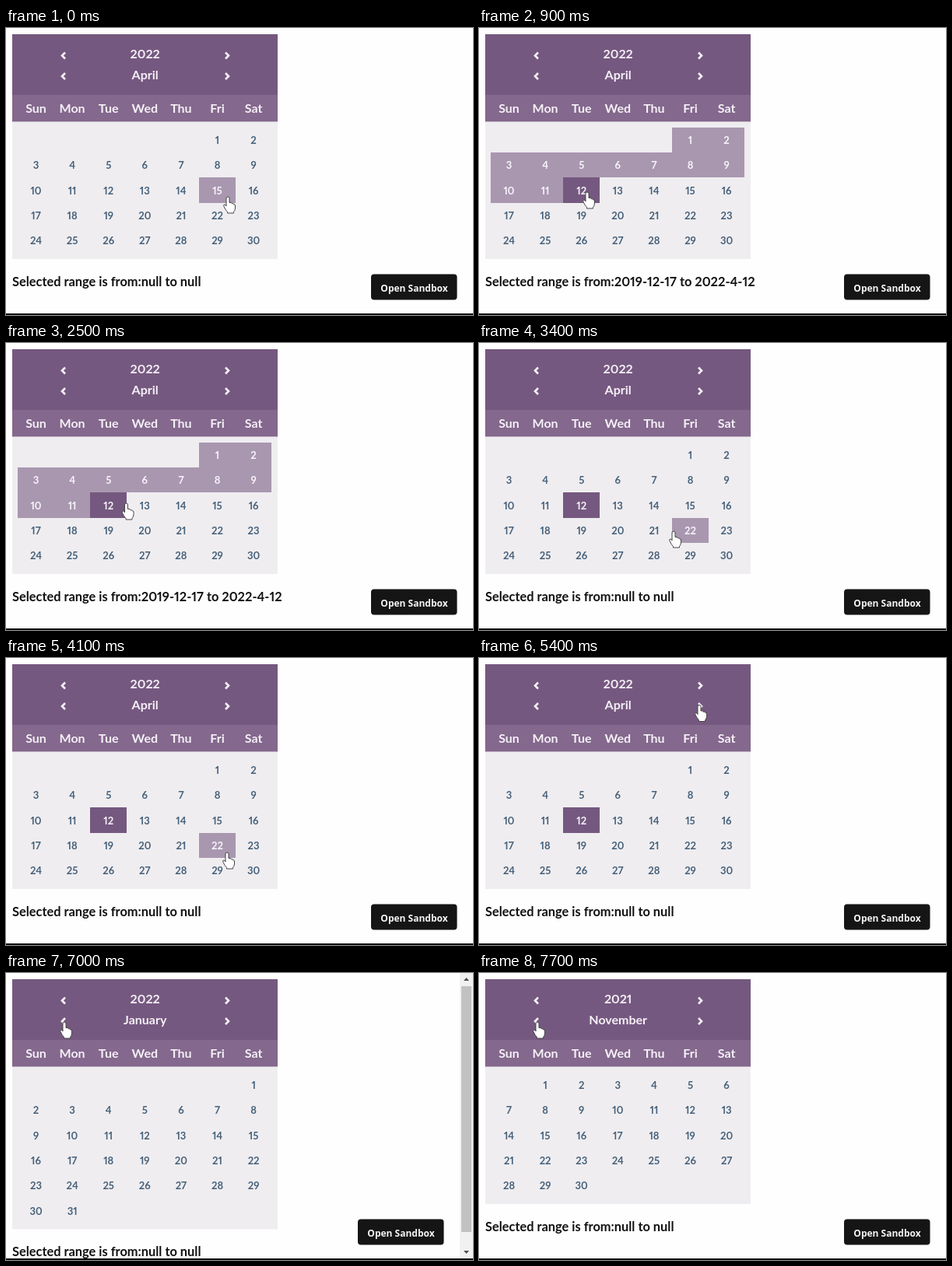
An HTML page for the animation above (8 s loop, 600 by 369 pixels).

```html
<!DOCTYPE html>
<html lang="en">
<head>
<meta charset="utf-8">
<title>Date range calendar</title>
<style>
  html, body { margin: 0; width: 100%; height: 100%; overflow: hidden; background: #fefefe; }
  svg { display: block; width: 600px; height: 369px; }
  text { font: 700 16px Lato, sans-serif; font-variant-numeric: proportional-nums; fill: #f5f0f7; }
  .mid { text-anchor: middle; }
  .date { font-size: 13px; }
  #range { font-size: 16.4px; fill: #111; }
  #button text { font: 700 12px "Open Sans", sans-serif; fill: #f4f4f4; }
  .arrow { fill: none; stroke: #f5f0f7; stroke-width: 2.6; }
</style>
</head>
<body>
<svg viewBox="0 0 600 369">
  <rect width="600" height="369" fill="#fefefe"/>
  <rect id="body" x="8" y="120" width="341" fill="#efedf0"/>
  <rect x="8" y="8" width="341" height="78" fill="#75587f"/>
  <rect x="8" y="86" width="341" height="34.4" fill="#84688d"/>
  <text id="year" class="mid" x="178.7" y="39"></text>
  <text id="month" class="mid" x="178.7" y="65.5"></text>
  <g id="grid"></g>
  <text id="range" x="8"></text>
  <g id="scrollbar">
    <rect x="583" width="17" height="367" fill="#f1f1f1"/>
    <rect x="585" y="17" width="13" height="316" fill="#c1c1c1"/>
    <path d="M588 10l3.5-4 3.5 4zM588 357l3.5 4 3.5-4z" fill="#505050"/>
  </g>
  <g id="button">
    <rect x="469" y="316.500" width="110.500" height="33" rx="4" fill="#151515"/>
    <text class="mid" x="524.500" y="338.500">Open Sandbox</text>
  </g>
  <rect y="367" width="600" height="2" fill="#000"/>
  <path id="hand" fill="#fff" stroke="#444" stroke-width="1" stroke-linejoin="round"
    d="M-2 2Q-2 0 0 0Q2 0 2 2V7.5Q5 6.5 5.3 8.8Q7.6 8 8 10Q9.8 9.6 9.5 12V15Q9 18 7.5 19.5V21H-.5V19.5Q-3 17 -5 12.5Q-6 10 -4 10Q-3 10 -2 12Z"/>
</svg>
<script>
const LOOP = 8000, STEP = 100, DAY = 864e5;
const LEFT = 15.2, TOP = 127.6, CELL_W = 46.6, CELL_H = 32.4;
const DARK = '#75587f', LIGHT = '#a997b0', INK = '#456079', PALE = '#f8f5fa';
const PICKED = Date.UTC(2022, 3, 12);

// The pointer rests between glides; hover follows from where it is.
const GLIDES = [
  { from: 0, to: 0, x: 285, y: 217 },
  { from: 100, to: 600, x: 139, y: 211 },
  { from: 1200, to: 1300, x: 262, y: 214 },
  { from: 2200, to: 2500, x: 154.5, y: 206 },
  { from: 3000, to: 3400, x: 250, y: 242 },
  { from: 3700, to: 3900, x: 300, y: 256 },
  { from: 4100, to: 4100, x: 284, y: 250 },
  { from: 4700, to: 5000, x: 283, y: 60.5 },
  { from: 6200, to: 6200, x: 75, y: 63 }
];
const BACK_CLICKS = [6300, 6700, 7000, 7300, 7700];
const rangeShown = time => time >= 800 && time < 2700;

const $ = id => document.getElementById(id);
const easeOut = p => 1 - (1 - p) ** 2;
const name = (date, format) => date.toLocaleString('en', { timeZone: 'UTC', ...format });

function add(tag, attrs, content = '') {
  const node = document.createElementNS('http://www.w3.org/2000/svg', tag);
  for (const key in attrs) node.setAttribute(key, attrs[key]);
  node.textContent = content;
  return $('grid').appendChild(node);
}

const cells = Array.from({ length: 42 }, (_, i) => {
  const col = i % 7, x = LEFT + CELL_W * col, y = TOP + CELL_H * Math.floor(i / 7);
  const center = x + CELL_W / 2;
  if (i < 7) {
    const weekday = name(new Date(Date.UTC(2022, 4, 1 + col)), { weekday: 'short' });
    add('text', { class: 'mid', x: center, y: 109 }, weekday);
  }
  return {
    box: add('rect', { x, y, width: CELL_W, height: CELL_H, 'shape-rendering': 'crispEdges' }),
    label: add('text', { class: 'mid date', x: center, y: y + 21.2 })
  };
});

for (const y of [35.5, 62]) {
  add('path', { class: 'arrow', d: `M76 ${y - 4}l-4 4 4 4M282 ${y - 4}l4 4-4 4` });
}

function pointer(time) {
  const tick = Math.floor(time / STEP) * STEP;
  let x = 0, y = 0;
  for (const glide of GLIDES) {
    if (tick < glide.from) break;
    const p = easeOut(Math.min(1, (tick - glide.from + STEP) / (glide.to - glide.from + STEP)));
    x += (glide.x - x) * p;
    y += (glide.y - y) * p;
  }
  return { x, y };
}

function cellUnder({ x, y }) {
  const col = Math.floor((x - LEFT) / CELL_W), row = Math.floor((y - TOP) / CELL_H);
  return row >= 0 ? row * 7 + col : -1;
}

function draw(time) {
  const hand = pointer(time), hovered = cellUnder(hand);
  const clicks = BACK_CLICKS.filter(click => click <= time).length;
  const first = new Date(Date.UTC(2022, 3 - clicks, 1));
  const offset = first.getUTCDay();
  const count = (Date.UTC(2022, 4 - clicks, 1) - first) / DAY;
  const extra = offset + count > 35 ? CELL_H : 0;
  const ranged = rangeShown(time);

  cells.forEach(({ box, label }, i) => {
    const day = i - offset + 1;
    const valid = day >= 1 && day <= count;
    const date = +first + (day - 1) * DAY;
    let fill = 'none';
    if (valid && time >= 800 && date === PICKED) fill = DARK;
    else if (valid && (i === hovered || ranged && date < PICKED)) fill = LIGHT;
    box.setAttribute('fill', fill);
    label.style.fill = fill === 'none' ? INK : PALE;
    label.textContent = valid ? day : '';
  });

  $('year').textContent = first.getUTCFullYear();
  $('month').textContent = name(first, { month: 'long' });
  $('body').setAttribute('height', 177 + extra);
  $('range').setAttribute('y', 332 + extra);
  $('range').textContent = 'Selected range is from:' +
    (ranged ? '2019-12-17 to 2022-4-12' : 'null to null');
  // A sixth week overflows the page, so its scrollbar shifts the button.
  $('scrollbar').setAttribute('visibility', extra ? 'visible' : 'hidden');
  $('button').setAttribute('transform', `translate(${extra ? -17 : 0} 0)`);
  $('hand').setAttribute('transform', `translate(${hand.x} ${hand.y})`);
}

const start = performance.now();
function tick() {
  draw((performance.now() - start) % LOOP);
  requestAnimationFrame(tick);
}
tick();
</script>
</body>
</html>
```
